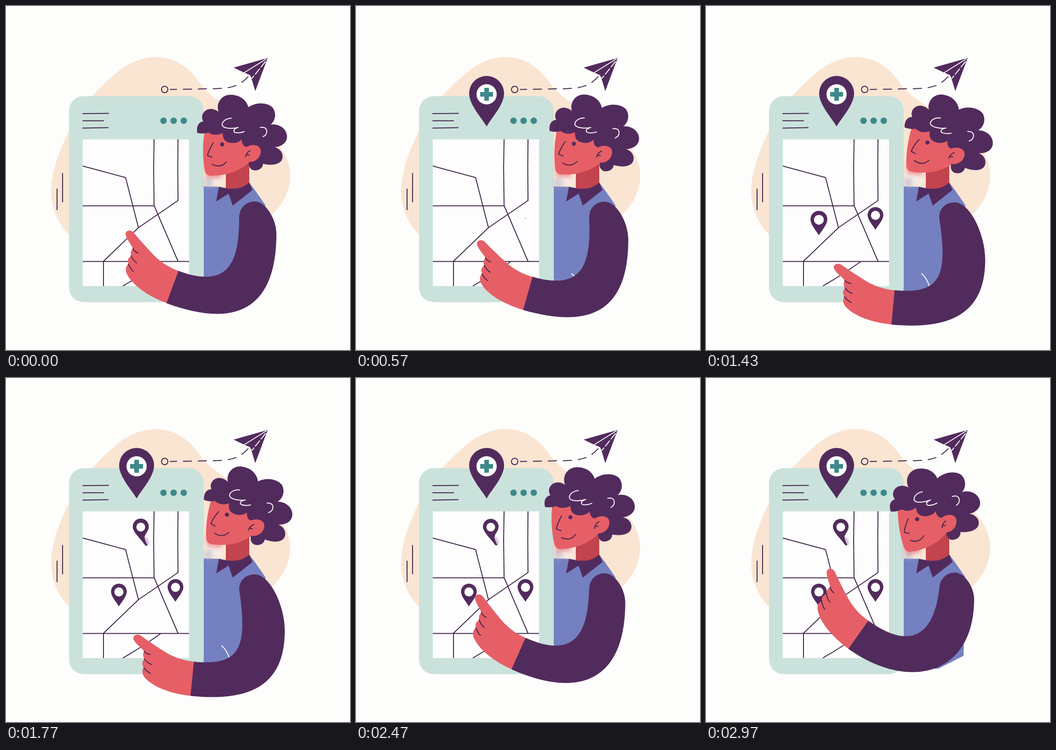
An HTML page for the animation above (3.01 s loop, 748 px wide and 748 px high).

```html
<!DOCTYPE html>
<html lang="en">
<head>
<meta charset="utf-8">
<title>Map search</title>
<style>
  html, body { margin: 0; width: 100%; height: 100%; overflow: hidden; background: #fdfdfb; }
  svg { display: block; width: 100vw; height: 100vh; }
  .line, .light { fill: none; stroke: #40244a; stroke-width: 2; stroke-linecap: round; stroke-linejoin: round; }
  .light { stroke: #fdfdfb; }
  .plum { fill: #522b5d; }
  .skin { fill: #e65f67; }
  .mint { fill: #cbe2dc; }
  .teal { fill: #3e898b; }
  .blue { fill: #7480c0; }
  .paper { fill: #fdfdfd; }
  .soft { filter: blur(5px); }
</style>
</head>
<body>
<svg viewBox="0 0 748 748">
  <defs>
    <g id="pin">
      <path class="plum" d="M0 55C-10 37-38 8-38-17A38 38 0 0 1 38-17C38 8 10 37 0 55Z"/>
      <circle class="paper" cy="-15" r="22"/>
    </g>
  </defs>

  <path fill="#fae5d2" d="M325 111C372 112 398 135 420 165C440 195 470 212 510 235C560 262 618 310 618 368C618 405 600 432 580 453C520 510 400 560 300 560C240 560 180 540 137 497C110 470 98 435 98 400C100 350 122 300 150 245C170 210 215 165 250 137C275 120 300 111 325 111Z"/>
  <path class="line" d="M123 364V426M111 398V443"/>

  <!-- paper plane -->
  <circle class="line" cx="345" cy="181.500" r="7"/>
  <path class="line" stroke-dasharray="18 14.500" stroke-dashoffset="4" d="M357 181.500L440 180C480 180 497 176 508 169Q518 163 527 153"/>
  <path class="plum" d="M495 134L569 113L542 185L533 155L530 150L518 145Z"/>
  <path class="light" d="M566 115L518 145"/>
  <path class="light" stroke-dasharray="15 5" d="M564 121L535 157"/>

  <!-- torso -->
  <path class="blue" d="M422 392L463 393L505 400L529 384L541 400L564 433L560 604L505 632H422Z"/>
  <path class="light" d="M469 582Q481 593 486 610"/>

  <!-- phone -->
  <rect class="mint" x="137" y="196" width="293" height="448" rx="32"/>
  <path class="line" d="M167 234L223 233.500M167 249.500H212M167 265.500L222 264.500"/>
  <g class="teal">
    <circle cx="342.500" cy="249.500" r="7"/><circle cx="364.500" cy="249.500" r="7"/><circle cx="386.500" cy="249.500" r="7"/>
  </g>
  <rect class="paper" x="167" y="290" width="231" height="319"/>
  <path class="line" style="stroke-linecap:butt" d="M322 290L321 352L322 434L374 555M374 290L373.500 352L374 423L288 482L212 555V609M167 348L260 373L288 482M167 434.500H322M167 555.500H398M254 609Q297 584 336 556"/>

  <!-- map pins -->
  <g transform="translate(284 207)"><g class="pop">
    <use href="#pin"/>
    <path class="teal" d="M-5-29H5V-20H14V-10H5V-1H-5V-10H-14V-20H-5Z"/>
  </g></g>
  <g transform="translate(368.500 462) scale(.45)"><g class="pop"><use href="#pin"/></g></g>
  <g transform="translate(245.500 472) scale(.45)"><g class="pop"><use href="#pin"/></g></g>
  <g transform="translate(293 331) scale(.45)"><g class="pop">
    <path class="soft" d="M22 36L34 70" stroke="#a57fb6" stroke-width="14" opacity=".6"/>
    <path class="plum" d="M-38-17A38 38 0 0 1 38-17C38 4 20 16 18 34Q22 56 32 70Q26 78 18 68C4 44-38 10-38-17Z"/>
    <circle class="paper" cy="-15" r="21"/>
  </g></g>

  <!-- neck and head -->
  <path class="soft" fill="#f6eeea" opacity=".75" d="M436 358H472V388H436Z"/>
  <ellipse class="soft" cx="440" cy="384" rx="10" ry="11" fill="#a9b0cf" opacity=".5"/>
  <path fill="#c1444f" d="M478 350L529 325V390L505 402L478 399Z"/>
  <g id="head">
    <path class="skin soft" opacity=".6" d="M433 350H468V374H436Z"/>
    <path class="skin" d="M434 262C427 292 427 330 432 356Q434 369 446 369C478 369 508 360 530 339V275Z"/>
    <path class="plum" d="M416 276C413 262 419 252 429 251C421 238 432 222 448 224Q456 225 462 230C456 212 468 193 488 193C509 193 523 205 527 220C545 208 568 210 579 220C589 232 586 250 575 258C592 255 611 266 611 284C611 298 598 306 584 307C600 311 605 326 599 336C592 346 574 347 559 343C558 355 546 359 537 357Q530 354 528 346V306Q514 309 512 290C506 300 480 302 473 288C472 284 471 281 471 276C460 282 448 281 440 275Q430 279 416 276Z"/>
    <path class="skin" d="M521 308C532 299 554 300 554 316C554 330 541 341 526 339Z"/>
    <path class="line" d="M531 314Q522 319 521 328M523 323L529 324M451 297Q441 313 438 325L448 329M448 344Q466 354 479 339"/>
    <circle id="eye" class="plum" cx="470" cy="301" r="4.500"/>
    <path class="light" d="M490 244C477 244 465 255 472 262C478 267 495 267 505 264C497 266 492 272 498 275Q508 277 518 273M553 264Q566 262 567 272Q567 281 559 284"/>
  </g>
  <path class="plum" d="M463 393Q490 401 510 395Q521 391 529 384L536 400L493 434L484 408L457 425Z"/>

  <!-- arm; the hand is drawn from the top of its cuff -->
  <g id="hand"><g transform="translate(-375 -576)">
    <path class="skin" d="M378 577L375 576C350 567 331 553 315 535C300 519 287 504 277 492C270 485 259 488 260 497C262 507 270 515 276 527C271 531 270 539 273 544C265 546 263 556 267 561C259 565 259 577 264 585C278 610 312 632 349 646L352 647Z"/>
    <path class="line" d="M276 527Q279 534 287 537M272 543Q276 553 284 559M266 561Q270 571 277 577"/>
  </g></g>
  <path id="sleeve" class="plum"/>
</svg>

<script>
const LOOP = 3010;
const TURN = 1600;       // arm is lowest here
const HEAD_LEAD = 50;
const CUFF = 75;
const $ = id => document.getElementById(id);
const pins = document.querySelectorAll('.pop');

// 0 at rest, 1 lowered, -1 raised
function sway(t) {
  return t < TURN
    ? .515 * (1 - Math.cos(Math.PI * t / TURN))
    : -.015 + 1.045 * Math.cos(Math.PI * (t - TURN) / 1530);
}

function backOut(x) {
  if (x <= 0) return 0;
  if (x >= 1) return 1;
  const u = x - 1;
  return 1 + 2.70158 * u ** 3 + 1.70158 * u ** 2;
}

function drawArm(s) {
  const bend = (rest, slope, curve) => rest + slope * s + curve * s * s;
  const turn = -15 * s;
  const along = (20.3 + turn) * Math.PI / 180;   // from hand to elbow
  const dx = Math.cos(along), dy = Math.sin(along);

  const top = [bend(375, 28.5, 6.5), bend(576, 45, -3)];
  const low = [top[0] - CUFF * dy, top[1] + CUFF * dx];
  const reach = ([x, y], d) => [x + d * dx, y + d * dy];

  const elbow = [bend(588, 12, 7), bend(495, 36, 21)];
  const shoulder = [541, bend(425, 2, 0)];
  const pit = [507, 460];

  const outer = `C${reach(low, bend(160, -15, -15))} ${elbow[0]},${elbow[1] + bend(165, -26, -23)} ${elbow}`;
  const cap = `C${elbow[0]},${elbow[1] - .45 * (elbow[1] - shoulder[1])} `
    + `${(elbow[0] + shoulder[0]) / 2},${shoulder[1]} ${shoulder}`;
  const front = `C${shoulder[0] - 20},${shoulder[1]} ${pit[0]},${pit[1] - 20} ${pit}`;
  const inner = `C${pit[0] + bend(0, 14, 6)},${pit[1] + bend(92, 31, 6)} ${reach(top, bend(120, -20, 0))} ${top}`;

  $('sleeve').setAttribute('d', `M${low}${outer}${cap}${front}${inner}Z`);
  $('hand').setAttribute('transform', `translate(${top}) rotate(${turn})`);
}

function draw(t) {
  drawArm(sway(t));
  $('head').setAttribute('transform', `rotate(${8.5 * sway(t + HEAD_LEAD)} 503 375)`);

  const blink = Math.max(0, 1 - Math.abs(t - 2070) / 100);
  $('eye').setAttribute('r', 4.5 - 3 * blink);

  pins.forEach((pin, i) => {
    const size = backOut((t - 60 - 505 * i) / 500);
    pin.setAttribute('transform', `scale(${size})`);
    pin.setAttribute('visibility', size > 0 ? 'visible' : 'hidden');
  });
}

function tick() {
  draw(performance.now() % LOOP);
  requestAnimationFrame(tick);
}
tick();
</script>
</body>
</html>
```
